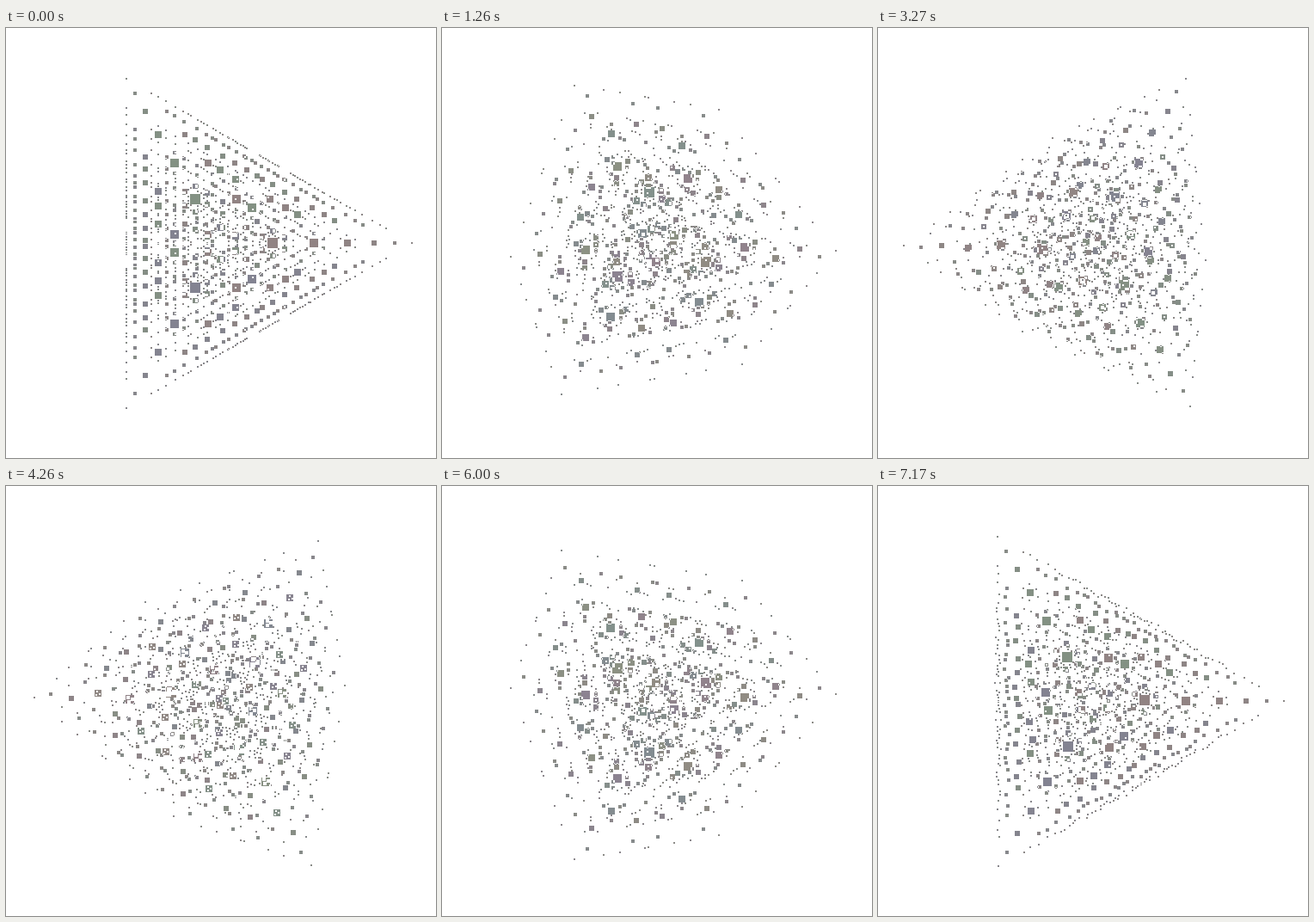
Recreate the animation shown at these times as an HTML page with a canvas. Size 500x500 px, loop 7200 ms.

```html
<!DOCTYPE html>
<html lang="en">
<head>
<meta charset="utf-8">
<title>Counter-rotating triangles</title>
<style>
  html, body { margin: 0; width: 100%; height: 100%; overflow: hidden; background: #fff; }
  canvas { display: block; width: 500px; height: 500px; }
</style>
</head>
<body>
<canvas id="stage" width="500" height="500"></canvas>
<script>
const ctx = document.getElementById('stage').getContext('2d');
const LOOP = 7200, STEP = 30, LEVELS = 6;
const FIRST_ARM = 60, ARM_RATIO = 0.8;
const SATURATION = [6, 6, 5, 4, 2, 2];

// Whole pixels, rounded up; the margin absorbs floating-point noise.
const snap = v => Math.ceil(v - 1e-6);

// Each level turns against the one before; overlapping squares cancel out.
function drawLevel(parents, level, turn) {
  const arm = FIRST_ARM * ARM_RATIO ** level;
  const size = 2 * (LEVELS - level);
  const spin = level % 2 ? -turn : turn;
  const children = [];
  for (let i = 0; i < 3; i++) {
    const angle = i * 120 + spin;
    const rad = angle * Math.PI / 180;
    const hue = ((2 * angle) % 360 + 360) % 360;
    const dx = arm * Math.cos(rad), dy = arm * Math.sin(rad);
    ctx.fillStyle = `hsl(${hue}, ${SATURATION[level]}%, 54%)`;
    for (const [px, py] of parents) {
      const x = px + dx, y = py + dy;
      ctx.fillRect(snap(x - size / 2), snap(y - size / 2), size, size);
      children.push([x, y]);
    }
  }
  return children;
}

function draw(time) {
  const phase = Math.max(0, Math.floor((time % LOOP) / STEP) - 1);
  ctx.globalCompositeOperation = 'source-over';
  ctx.clearRect(0, 0, 500, 500);
  ctx.globalCompositeOperation = 'xor';
  let points = [[250, 250]];
  for (let level = 0; level < LEVELS; level++) {
    points = drawLevel(points, level, phase / 2);
  }
}

const start = performance.now();
function tick() {
  draw(performance.now() - start);
  requestAnimationFrame(tick);
}
tick();
</script>
</body>
</html>
```
